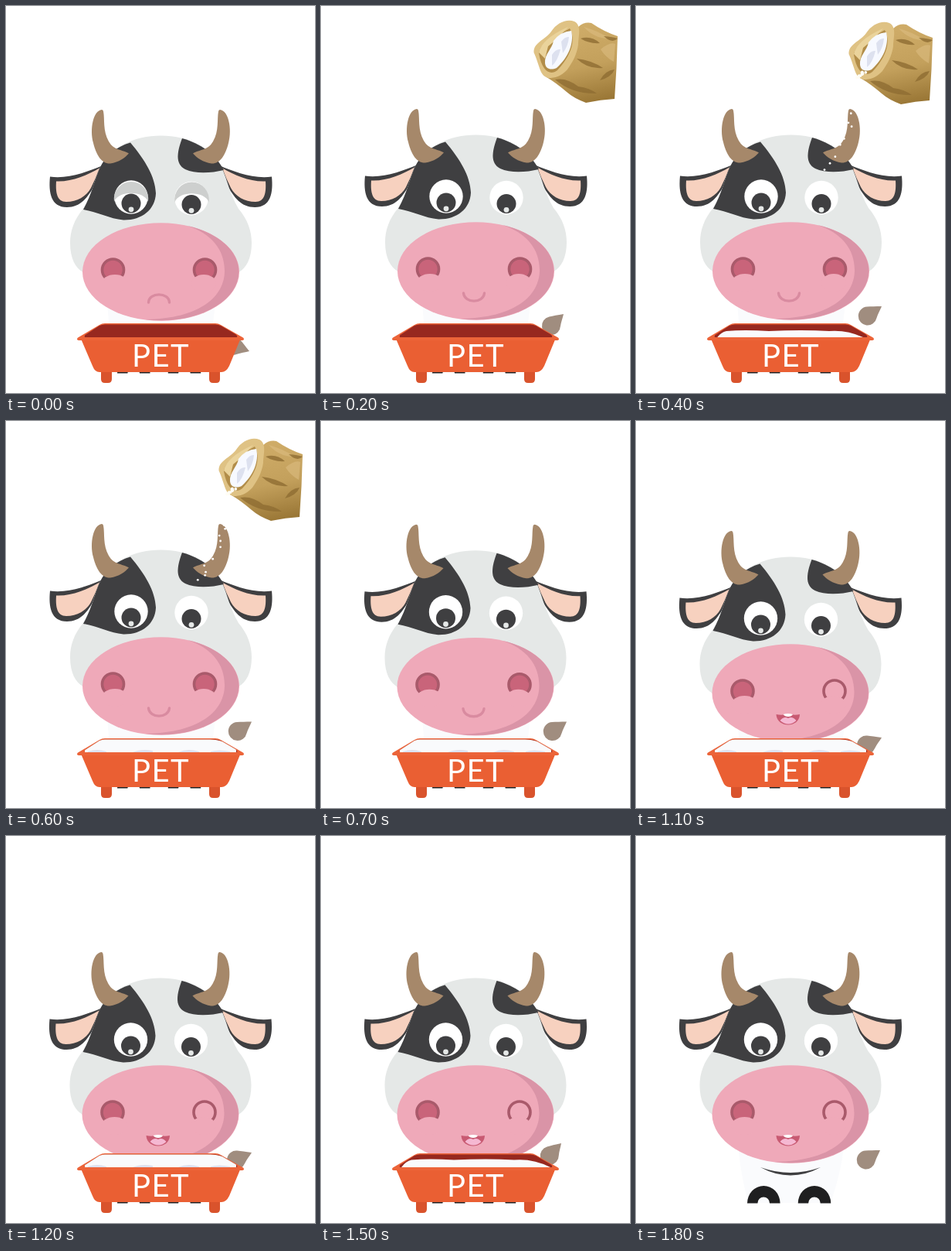
An HTML page for the animation above (1950 ms loop, 400 by 500 pixels).

```html
<!DOCTYPE html>
<html lang="en">
<head>
<meta charset="utf-8">
<title>Hungry cow</title>
<style>
html, body { margin: 0; width: 100%; height: 100%; overflow: hidden; background: #fff }
svg { display: block; width: 100%; height: 100% }
.dark { fill: #3f3f41 }
.skin { fill: #f7d1bf }
.horn { fill: #a6886a }
.pink { fill: #efa9b9 }
.line { fill: none; stroke: #d98ba0; stroke-width: 3.4; stroke-linecap: round }
.ring { fill: #c9647a; stroke: #a95a6b; stroke-width: 3.6 }
.lid { fill: #cdcfce }
.white { fill: #fff }
.cool { fill: #dde1ef }
text { font: 40px Lato, "Open Sans", sans-serif; letter-spacing: 1.5px; fill: #fff }
</style>
</head>
<body>
<svg viewBox="0 0 400 500">
  <defs>
    <linearGradient id="cloth" x1=".4" y1="0" x2=".6" y2="1">
      <stop stop-color="#d0ad69"/><stop offset=".55" stop-color="#c3a05c"/><stop offset="1" stop-color="#9a7736"/>
    </linearGradient>
    <clipPath id="basin"><path d="M102 428Q101 425 104 424L121 413Q124 411.500 128 411.500H271Q275 411.500 278 413L297 424Q300 426 299 428Z"/></clipPath>
    <g id="side">
      <path class="dark" d="M125 205C106 213 80 223 57 219.500C55 240 58 259 79 259C96 259 106 247 116 228Z"/>
      <path class="skin" d="M121 208.500C105 217.500 85 226.500 65 225.500C64 240 66 252 78 252C92 252 104 245 110 234Q116 222 121 208.500Z"/>
    </g>
    <path id="horn" class="horn" d="M124 133C113 134 108 158 113 176C117 192 124 203 135 202.500C146 201 154 195 159 189.500C150 184 140 186 133 174C125 160 128 145 126 135Q125.500 133 124 133Z"/>
    <g id="eye">
      <circle class="white" r="21.700"/>
      <circle class="dark" cy="8" r="12.500"/>
      <circle cy="15.800" r="3.400" fill="#e5e8e7"/>
    </g>
    <path id="lid" class="lid" d="M-22 5A22.300 22.300 0 1 1 22 5C17 -10 -17 -10 -22 5Z"/>
  </defs>

  <path fill="#fafbfd" d="M131 380H271C268 420 263 440 252 474H145C137 440 133 420 131 380Z"/>
  <path class="dark" d="M161 428Q200 442 239 428Q200 449 161 428Z"/>
  <path id="hoof" fill="#1f1f20" d="M144 474.500A21.300 22.500 0 0 1 186.600 474.500H173A7.800 8 0 0 0 157.400 474.500Z"/>
  <use href="#hoof" x="65.700"/>
  <path id="tail" fill="#a08d7f" d="M0 0C-8 0 -14 .2 -19 .5A12 12 0 1 0 -6.500 15C-5 10 -2 5 0 0Z"/>

  <g id="head">
    <use href="#side"/>
    <use href="#side" transform="matrix(-1 0 0 1 401 0)"/>
    <path fill="#e5e8e7" d="M200.500 166.500C166 166.500 134 182 122 207C114 225 112 240 100 261C88 275 83 290 83 305C83 325 90 338 100 343H301C311 338 318 325 318 305C318 290 313 275 301 261C289 240 287 225 279 207C267 182 235 166.500 200.500 166.500Z"/>
    <path class="dark" d="M161 175.500C180 198 193 219 194 241C193 263 175 276 152 275.500C134 274 119 265 100 262C112 240 114 225 122 207C130 192 142 181 161 175.500Z"/>
    <path class="dark" d="M228 170C222 186 218 203 232 210C245 216 265 215 282 211C270 189 252 177 228 170Z"/>
    <use href="#horn"/>
    <use href="#horn" transform="matrix(-1 0 0 1 401 0)"/>
    <use href="#eye" x="162" y="246"/>
    <use href="#eye" x="240" y="247.500"/>
    <g class="sad"><use href="#lid" x="162" y="247"/><use href="#lid" x="240.500" y="247.500"/></g>
    <ellipse class="pink" cx="200.500" cy="342.500" rx="101.500" ry="63.300"/>
    <path fill="#da94a7" d="M235 283C266 293 283 314 283 341C283 374 252 403 180 404A100.800 62.500 0 0 0 301.300 342.500A100.800 62.500 0 0 0 235 283Z"/>
    <circle class="ring" cx="138.500" cy="340" r="14"/>
    <ellipse class="pink" cx="141" cy="357.500" rx="17" ry="11.500"/>
    <circle id="nostril" class="ring" cx="257.500" cy="340" r="14"/>
    <ellipse class="pink" cx="256" cy="357.500" rx="16" ry="11.500"/>
    <path class="line sad" d="M184.500 382C185 368.500 211 368.500 211.500 382"/>
    <path class="line happy" d="M184.500 371C186 384.500 210 384.500 211.500 371"/>
    <g class="eating">
      <path fill="#c85a72" d="M182 370Q190 371.500 197.500 369.500Q205 371.500 212.500 370C212 388 183 388 182 370Z"/>
      <path fill="#f5b8d2" d="M187 378Q192 372 197.500 375Q203 372 208 378Q198 387 187 378Z"/>
      <path class="white" d="M191 370Q197.500 368 203.500 370Q202 373 197.500 373Q193 373 191 370Z"/>
    </g>
  </g>

  <g id="tray">
    <path id="foot" fill="#d9532c" d="M123 468H137V482Q137 487 132 487H128Q123 487 123 482Z"/>
    <use href="#foot" x="140"/>
    <path fill="#ea5f33" d="M97 430H303.500L289 465Q285 473 279 473H121Q115 473 112 465Z"/>
    <path fill="#ec6439" d="M93 428.500L121 412Q124 410 128 410H271Q275 410 278 412L307 428.500Q309.500 431 306 432H94Q90.500 431 93 428.500Z"/>
    <g clip-path="url(#basin)">
      <path fill="#97281f" d="M95 410H305V430H95Z"/>
      <g id="food">
        <path fill="#f9fafc" d="M102 424Q108 413 117 411Q140 409 172 411Q215 409 250 411Q275 409 298 421V450H102Z"/>
        <path class="cool" d="M106 427Q118 423 130 427V440H106ZM160 430Q172 423 190 426V440H160ZM219 430Q232 422 250 427V440H219ZM265 427Q275 424 290 427V440H265Z"/>
      </g>
    </g>
    <text x="163" y="466">PET</text>
  </g>

  <g id="grains" class="white"></g>

  <g id="sack">
    <path fill="url(#cloth)" d="M333 27Q341 20 350 22Q366 33 384 39Q383 80 380 120Q362 121 343 125Q327 119 318 111Q304 99 292 92L318 60Z"/>
    <path fill="#dcbd80" opacity=".6" d="M340 27Q356 31 374 42Q355 43 340 27ZM362 56Q374 46 381 49L379 72Q368 66 362 56Z"/>
    <path fill="#8f6d32" opacity=".8" d="M336 42Q350 38 361 48Q347 49 336 42ZM331 68Q350 70 365 80Q345 82 331 68ZM366 39Q378 40 384 42Q377 49 366 39ZM303 95Q318 92 333 104Q348 106 357 113Q325 114 303 95ZM361 96Q368 83 380 82Q376 92 361 96Z"/>
    <path fill="#dfc284" d="M275.500 60C275 47 290 44 298 33C305 22 318 16 328 20C338 25 333 40 333 50C331 63 326 72 319 82C311 91 302 93 295 93C283 91 284 79 275.500 60Z"/>
    <path fill="#b28d49" d="M282 61C284 47 300 42 322 29C330 43 325 63 306 83C297 90 286 85 282 61Z"/>
    <path fill="#ead39b" d="M282 60Q286 42 320 27L305 43L294 52L290 68Z"/>
    <path fill="#f7f9ff" d="M290 74C289 62 299 56 301 45Q310 33 324 32C328 48 320 67 305 80C298 83 291 82 290 74Z"/>
    <path class="cool" d="M299 63Q304 55 310 56Q306 72 299 77ZM311 46Q316 39 321 40Q320 52 313 61Z"/>
    <g id="spill" fill="#fffdf5"></g>
  </g>
</svg>
<script>
const $ = id => document.getElementById(id);
const show = (el, on) => el.style.display = on ? '' : 'none';
const move = (el, x, y, turn = 0) => el.setAttribute('transform', `translate(${x} ${y}) rotate(${turn})`);
const clamp = v => Math.min(1, Math.max(0, v));
const noise = n => Math.abs(Math.sin(n * 127.1 + 3) * 43758.5) % 1;
const dots = (n, r, at) => Array.from({ length: n }, (_, i) => {
  const [x, y] = at(i);
  return `<circle cx="${x}" cy="${y}" r="${r}"/>`;
}).join('');

$('spill').innerHTML = dots(9, 1.9, i => [285 + 15 * noise(i), 83 + 9 * noise(i + 50)]);

// Tail poses: step, tip x, tip y, angle.
const tailKeys = [[0, 315, 446, 53], [2, 314, 398, -9], [4, 318, 388, 0], [9, 318, 389, 0],
  [11, 318, 409, 9], [13, 318, 409, 9], [14, 311, 397, -12], [15, 316, 406, 0]];

function pose(keys, step) {
  const i = keys.findIndex(k => k[0] > step);
  if (i < 0) return keys.at(-1).slice(1);
  const a = keys[i - 1], b = keys[i], u = (step - a[0]) / (b[0] - a[0]);
  return a.slice(1).map((v, j) => v + (b[j + 1] - v) * u);
}

function draw(step) {
  const mood = step < 1 ? 'sad' : step < 11 ? 'happy' : 'eating';
  for (const name of ['sad', 'happy', 'eating'])
    document.querySelectorAll('.' + name).forEach(el => show(el, name === mood));
  $('nostril').style.fill = mood === 'eating' ? '#efa9b9' : '';

  // The head leans towards the tray, then dips in.
  const lean = clamp((step - 6) / 5);
  const drop = step < 12 ? 9 * lean ** 1.6 : 17;
  move($('head'), -Math.sin(2.6 * lean), mood === 'sad' ? 1 : drop);
  move($('tail'), ...pose(tailKeys, step));

  const pour = clamp((step - 2) / 4);
  const level = pour - clamp((step - 12) * .21);
  move($('food'), 0, (1 - level) * 18);
  show($('food'), level > 0);
  show($('tray'), step < 16);

  const pouring = step > 2 && step < 7;
  move($('sack'), 0, 4 * pour);
  show($('sack'), step > 0 && step < 7);
  show($('spill'), pouring);
  $('grains').innerHTML = pouring ? dots(14, 1.4, i => {
    const fall = 115 * (i + noise(i + step)) / 14;
    return [287 - .0032 * fall ** 2 + 10 * (noise(i * 3 + step) - .5), 97 + fall];
  }) : '';
}

const start = performance.now();
function frame() {
  const t = (performance.now() - start) % 1950;
  draw(t < 1200 ? Math.floor(t / 100) : 12 + Math.floor((t - 1200) / 150));
  requestAnimationFrame(frame);
}
frame();
</script>
</body>
</html>
```
